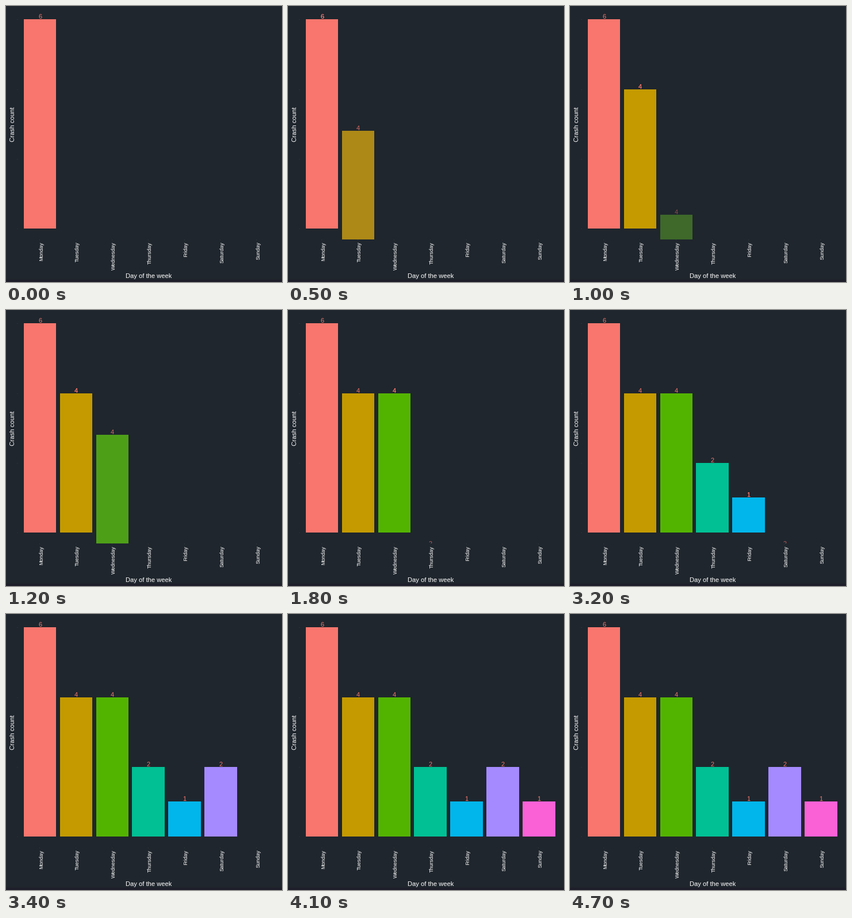
A matplotlib script for the animation above (5000 ms loop, 480 by 480 pixels).

```python
import numpy as np
import matplotlib.pyplot as plt
from matplotlib.animation import FuncAnimation
from matplotlib.patches import Rectangle

SIZE, DPI = 480, 72          # at 72 dpi one point is one pixel
FRAMES, INTERVAL = 50, 100
BG, STRIP, TICK, LABEL = "#1f262d", "#1e1e2a", "#2b3035", "#f8766d"

DAYS = ["Monday", "Tuesday", "Wednesday", "Thursday", "Friday", "Saturday", "Sunday"]
COUNTS = [6, 4, 4, 2, 1, 2, 1]
COLORS = ["#f8766d", "#c49a00", "#53b400", "#00c094", "#00b6eb", "#a58aff", "#fb61d7"]

LEFT, TOP, RIGHT, BOTTOM = 21, 5, 474, 406    # plot panel
BASE, UNIT = 387, 60.6
FIRST, PITCH, BAR = 30.85, 62.87, 56.5
STEPS, DROP = 4, 290.8                        # entry length and fall depth
START, CYCLE = 2, 7

TO_XYZ = np.array([[.4124, .3576, .1805], [.2126, .7152, .0722], [.0193, .1192, .9505]])
WHITE = TO_XYZ.sum(axis=1)


def to_lab(color):
    c = np.array([int(color[i:i + 2], 16) for i in (1, 3, 5)]) / 255
    lin = np.where(c > .04045, ((c + .055) / 1.055) ** 2.4, c / 12.92)
    t = TO_XYZ @ lin / WHITE
    x, y, z = np.where(t > .008856, np.cbrt(t), 7.787 * t + 16 / 116)
    return np.array([116 * y - 16, 500 * (x - y), 200 * (y - z)])


def to_rgb(lab):
    y = (lab[0] + 16) / 116
    f = np.array([y + lab[1] / 500, y, y - lab[2] / 200])
    t = np.where(f > .2069, f ** 3, (f - 16 / 116) / 7.787)
    lin = np.clip(np.linalg.solve(TO_XYZ, t * WHITE), 0, 1)
    return np.where(lin > .0031308, 1.055 * lin ** (1 / 2.4) - .055, 12.92 * lin)


def blend(a, b, w):
    return b if w >= 1 else tuple(to_rgb((1 - w) * to_lab(a) + w * to_lab(b)))


def pixel_axes(x0, y0, x1, y1):
    """Transparent axes whose data units are stage pixels, y downwards."""
    ax = fig.add_axes([x0 / SIZE, 1 - y1 / SIZE, (x1 - x0) / SIZE, (y1 - y0) / SIZE])
    ax.set(xlim=(x0, x1), ylim=(y1, y0))
    ax.axis("off")
    return ax


def box(ax, x, y, w, h, color):
    return ax.add_patch(Rectangle((x, y), w, h, fc=color, lw=0, antialiased=False))


plt.rcParams["font.family"] = "Liberation Sans"
fig = plt.figure(figsize=(SIZE / DPI, SIZE / DPI), dpi=DPI, facecolor=BG)
stage = pixel_axes(0, 0, SIZE, SIZE)
panel = pixel_axes(LEFT, TOP, RIGHT, BOTTOM)

box(stage, 0, 476, SIZE, 4, STRIP)
for value in (0, 2, 4, 6):
    box(stage, 19, round(BASE - value * UNIT), 2, 1, TICK)

bars, labels, echoes = [], [], []
for i, day in enumerate(DAYS):
    x0 = FIRST + i * PITCH
    mid = x0 + BAR / 2
    x, right = round(x0), round(x0 + BAR)
    box(stage, round(mid) - 1, BOTTOM, 1, 2, TICK)
    stage.text(mid + 5, 410, day, color="white", size=9.2, rotation=90,
               ha="right", va="baseline", rotation_mode="anchor")
    bars.append(box(panel, x, BASE, right - x, 0, COLORS[i]))
    for group in (labels, echoes):
        group.append(panel.text(mid, BASE, str(COUNTS[i]), color=LABEL, size=11,
                                ha="center", va="baseline", clip_on=True, zorder=5))

stage.text(248, 473, "Day of the week", color="white", size=11.1,
           ha="center", va="baseline")
stage.text(15.5, 205.5, "Crash count", color="white", size=11.1, rotation=90,
           ha="center", va="baseline", rotation_mode="anchor")


def entry_step(i, frame):
    return frame - START - CYCLE * (i - 1)


def draw(frame):
    for i, (bar, label, echo) in enumerate(zip(bars, labels, echoes)):
        p = 1 if i == 0 else min(max(entry_step(i, frame) / STEPS, 0), 1)
        sink = DROP * (1 - p)
        top = round(BASE - COUNTS[i] * UNIT + sink)
        bar.set_y(top)
        bar.set_height(round(BASE + sink) - top)
        weight = p ** .5
        bar.set_facecolor(blend(BG, COLORS[i], weight))
        bar.set_visible(p > 0)
        for text in (label, echo):
            text.set_y(top - 1)
            text.set_alpha(weight)
        label.set_visible(p > 0)
        # the count is drawn twice, so heavier, while the next day enters
        hold = STEPS if i < len(DAYS) - 1 else STEPS - 1
        echo.set_visible(0 <= entry_step(i + 1, frame) < hold)
    return bars + labels + echoes


anim = FuncAnimation(fig, draw, frames=FRAMES, interval=INTERVAL,
                     repeat=True, repeat_delay=0, blit=False)
plt.show()
```
